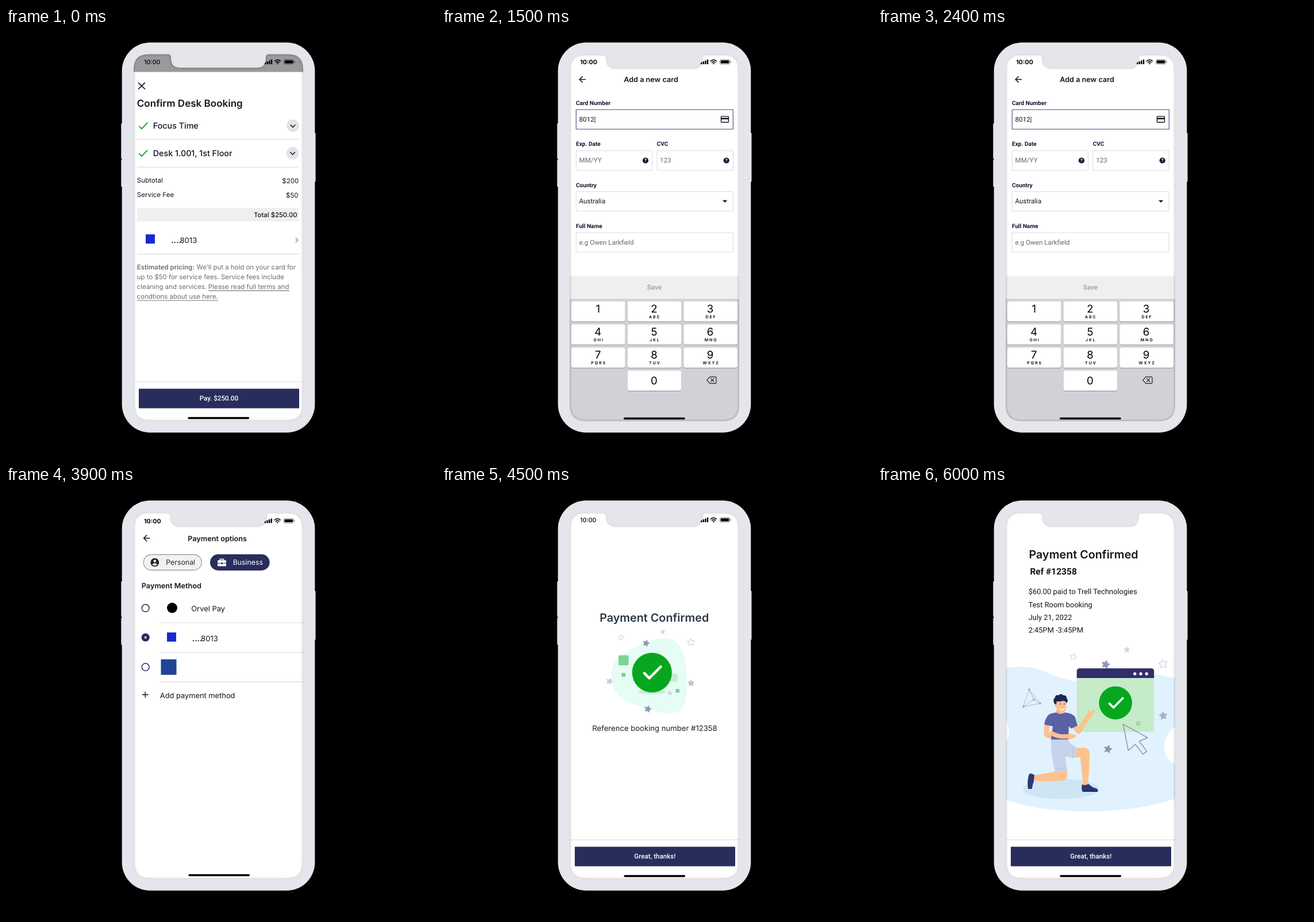
An HTML page that plays this animation: 748x748 px, repeating every 7500 ms.

```html
<!DOCTYPE html>
<html lang="en">
<head>
<meta charset="utf-8">
<title>Desk booking payment</title>
<style>
  html, body { margin: 0; width: 100%; height: 100%; overflow: hidden; background: #000; }
  svg { display: block; width: 748px; height: 748px; }
  text { text-rendering: geometricPrecision; font-optical-sizing: none; white-space: pre; }
  .i { font-family: Inter, sans-serif; }
  .r { font-family: Roboto, sans-serif; }
</style>
</head>
<body>
<svg id="stage" viewBox="0 0 748 748" xmlns="http://www.w3.org/2000/svg"></svg>
<script>
const NAVY = '#282d5c', INK = '#15151c', GREEN = '#06a71e', SKIN = '#fdc18e';

// Element helpers
const text = (x, y, str, size, o = {}) =>
  `<text class="${o.font || 'i'}" x="${x}" y="${y}" font-size="${size}" font-weight="${o.w || 400}" ` +
  `fill="${o.fill || INK}" text-anchor="${o.at || 'start'}" letter-spacing="${o.ls || 0}">${str}</text>`;
const rob = (x, y, str, size, o = {}) => text(x, y, str, size, { font: 'r', ...o });
const rect = (x, y, w, h, fill, r = 0, extra = '') =>
  `<rect x="${x}" y="${y}" width="${w}" height="${h}" rx="${r}" fill="${fill}" ${extra}/>`;
const circle = (x, y, r, fill, extra = '') =>
  `<circle cx="${x}" cy="${y}" r="${r}" fill="${fill}" ${extra}/>`;
const oval = (x, y, rx, ry, fill) => `<ellipse cx="${x}" cy="${y}" rx="${rx}" ry="${ry}" fill="${fill}"/>`;
const shape = (d, fill) => `<path d="${d}" fill="${fill}"/>`;
const line = (d, color, w = 1, cap = 'butt') =>
  `<path d="${d}" fill="none" stroke="${color}" stroke-width="${w}" stroke-linecap="${cap}" stroke-linejoin="${cap === 'round' ? 'round' : 'miter'}"/>`;
const rule = (x1, x2, y, color = '#dcdcdf') => line(`M${x1} ${y}H${x2}`, color, 1.2);

function star(x, y, r, color, turn = 10, hollow = false) {
  let pts = '';
  for (let k = 0; k < 10; k++) {
    const a = (turn - 90 + k * 36) * Math.PI / 180, q = k % 2 ? r * 0.5 : r;
    pts += `${(x + q * Math.cos(a)).toFixed(2)},${(y + q * Math.sin(a)).toFixed(2)} `;
  }
  return `<polygon points="${pts}" fill="${hollow ? 'none' : color}" stroke="${color}" stroke-width="1" stroke-linejoin="round"/>`;
}

// Shared pieces
function statusBar(weight, dx = 0, dy = 0) {
  let s = text(240.3, 63, '10:00', 10.6, { w: weight, fill: '#000' });
  for (let k = 0; k < 4; k++) {
    const h = 3.4 + k * 1.6;
    s += rect(450 + k * 3.6, 63 - h, 2.4, h, '#000', 0.6);
  }
  s += line('M467 57.8Q472.4 52.8 477.8 57.8', '#000', 1.7) +
       line('M469 60.2Q472.4 57 475.8 60.2', '#000', 1.6) +
       shape('M470.6 61.6Q472.4 60 474.2 61.6L472.4 63.4Z', '#000') +
       rect(483.4, 55, 17.2, 7.8, 'none', 2.2, 'stroke="#000" stroke-width=".8" stroke-opacity=".6"') +
       rect(484.8, 56.3, 14.4, 5.2, '#000', 1.2) +
       rect(501.4, 57.6, 1.2, 2.8, '#000', 0.6, 'opacity=".6"');
  return `<g transform="translate(${dx} ${dy})">${s}</g>`;
}
const home = (x, y) => rect(x, y, 106.7, 3.5, '#000', 1.75);
const backArrow = y => line(`M250 ${y}H239.2M244.7 ${y - 5.4}L239.2 ${y}L244.7 ${y + 5.4}`, INK, 1.5);
const button = (label, y, fill, color, w) =>
  rect(231, y, 279, 34, fill, 1) + rob(370.4, y + 20.6, label, 11.65, { w, fill: color, at: 'middle' });
const footer = (label) => rule(222, 517, 615.5) + button(label, 627.5, NAVY, '#fff', 500) + home(316.4, 676.7);
const cardTail = (x, y) => text(x, y, '....', 13.1, { w: 700 }) + text(x + 15.3, y, '8013', 13.1);

function dropRow(y, label, cx) {
  return line(`M231.3 ${y + 0.5}L236 ${y + 5.4}L246.2 ${y - 5.4}`, '#17a01e', 1.8) +
    text(255.8, y + 5.2, label, 14.3, { w: 500 }) +
    circle(cx, y, 10.9, '#e3e4ea') +
    line(`M${cx - 4.3} ${y - 1.8}L${cx} ${y + 2.5}L${cx + 4.3} ${y - 1.8}`, '#1d1d2b', 1.6);
}

function checkout(extra) {
  const g = { fill: '#6c6c70' }, size = 11.45;
  const u = 'text-decoration="underline" text-underline-offset="2"';
  return rect(222, 45, 295, 31.5, '#999a9b') + statusBar(500) +
    line('M230.2 95.2L241.8 106.4M241.8 95.2L230.2 106.4', INK, 1.7) +
    text(227.8, 137.4, 'Confirm Desk Booking', 17.05, { w: 600 }) +
    dropRow(170, 'Focus Time', 499) + rule(228, 509, 193.7) +
    dropRow(217.7, 'Desk 1.001, 1st Floor', 498.6) + rule(228, 509, 242.2) +
    text(227.8, 269.2, 'Subtotal', 11.55) + text(509.3, 269.8, '$200', 11.55, { at: 'end' }) +
    text(227.8, 294.3, 'Service Fee', 11.55) + text(508.6, 294.9, '$50', 11.55, { at: 'end' }) +
    rect(228, 313, 281, 23.5, '#efefef') +
    text(506.6, 329.2, 'Total $250.00', 11.35, { w: 500, at: 'end' }) +
    rect(243, 359, 16, 16, '#1a28cf') + cardTail(287.2, 373.7) +
    line('M503.8 365L507.8 369L503.8 373', '#8b8b90', 1.4) + rule(228, 509, 393.4) +
    text(227.8, 419.6, 'Estimated pricing:', size, { w: 600, ...g }) +
    text(331.6, 419.6, 'We’ll put a hold on your card for', size, g) +
    text(227.8, 436.9, 'up to $50 for service fees. Service fees include', size, g) +
    text(227.8, 454.1, 'cleaning and services.', size, g) +
    text(351.8, 454.1, 'Please read full terms and', size, g) +
    text(227.8, 471.3, 'condtions about use here.', size, g) +
    rule(352, 493, 456.8, '#77777b') + rule(228, 369.3, 474, '#77777b') + extra;
}

const payScene = () => checkout(footer('Pay. $250.00'));

const waitScene = () => checkout(
  circle(498.5, 133.5, 10.7, 'none', 'stroke="#e2e2e6" stroke-width="2.4"') +
  line('M497.4 122.9A10.7 10.7 0 0 1 499.8 122.9', '#111', 2.5) +
  rule(222, 517, 614.9) + button('Undo', 627, '#efefef', NAVY, 700) + home(316.4, 676));

function cardScene() {
  const label = (x, y, s) => rob(x, y, s, 10.1, { w: 700, fill: '#14152e' });
  const box = (x, y, w, color = '#dedee3') => rect(x, y, w, 34, '#fff', 0.5, `stroke="${color}" stroke-width="1.1"`);
  const help = x => circle(x, 230.5, 5.1, '#12132f') + rob(x, 233.4, '?', 8, { w: 700, fill: '#fff', at: 'middle' });
  const hint = { fill: '#67676c' };
  let s = statusBar(700) + backArrow(89.5) +
    text(316.2, 94.3, 'Add a new card', 12.65, { w: 600 }) +
    label(233, 133.6, 'Card Number') + box(233.3, 142, 273, '#4a4780') +
    rob(238.6, 162.8, '8012', 11.6) + rect(265.6, 154, 0.9, 11, INK) +
    rect(485.5, 153.6, 13, 10.4, 'none', 1.2, `stroke="${INK}" stroke-width="1.4"`) + rect(485.5, 156.2, 13, 2.6, INK) +
    label(233, 205.4, 'Exp. Date') + box(233.3, 213.5, 132.2) + rob(238.6, 234.4, 'MM/YY', 11.6, hint) + help(354) +
    label(373.7, 205.4, 'CVC') + box(374, 213.5, 132.3) + rob(379.2, 234.4, '123', 11.6, hint) + help(494.7) +
    label(233, 276.5, 'Country') + box(233.3, 284.5, 273) + rob(238.6, 305.3, 'Australia', 11.6) +
    shape('M488 299.6H496.2L492.1 303.8Z', '#12132f') +
    label(233, 348, 'Full Name') + box(233.3, 356, 273) + rob(238.6, 376.8, 'e.g Owen Larkfield', 11.6, hint) +
    rect(222, 432, 295, 39.5, '#efefef') + rob(369.4, 455.2, 'Save', 11.65, { w: 500, fill: '#9b9b9e', at: 'middle' }) +
    rect(222, 471.2, 295, 214, '#d1d2d8');
  const letters = ['', 'ABC', 'DEF', 'GHI', 'JKL', 'MNO', 'PQRS', 'TUV', 'WXYZ'];
  const key = (col, row, digit, sub) => {
    const x = 225 + col * 97.7, y = 475.5 + row * 40.2, mid = x + 46.7;
    return rect(x, y + 1, 93.5, 35, '#8b8c91', 3.6) + rect(x, y, 93.5, 35, '#fff', 3.6) +
      text(mid - 0.5, y + (digit ? 19 : 24), digit, 18.6, { at: 'middle', fill: '#000' }) +
      text(mid + 1, y + 29.2, sub, 7, { w: 600, ls: 1.9, at: 'middle', fill: '#000' });
  };
  letters.forEach((sub, k) => { s += key(k % 3, Math.floor(k / 3), k + 1, sub); });
  return s + key(1, 3, 0, '') +
    line('M465.8 606.8H475.4Q477 606.8 477 608.4V616.8Q477 618.4 475.4 618.4H465.8L460.8 612.6Z', '#222', 1.2, 'round') +
    line('M467.6 609.8L473 615.4M473 609.8L467.6 615.4', '#222', 1.2, 'round') + home(316, 677.5);
}

function optionsScene() {
  const radio = y => circle(242.7, y, 6.4, '#fff', `stroke="${NAVY}" stroke-width="1.5"`);
  return statusBar(700, -0.3, 1.6) + backArrow(90.8).replace('<path', '<path transform="translate(.4 0)"') +
    text(316.2, 95.7, 'Payment options', 12.7, { w: 600 }) +
    rect(239.3, 119.4, 101, 27, '#f1f1f3', 13.5, 'stroke="#929297" stroke-width="1.1"') +
    circle(258.8, 132.9, 7.4, '#222229') + circle(258.8, 130.5, 2.3, '#f1f1f3') +
    shape('M254.2 136.6Q258.8 131.9 263.4 136.6Q258.8 140.6 254.2 136.6Z', '#f1f1f3') +
    text(278.3, 137.3, 'Personal', 12.35, { fill: '#2a2a33' }) +
    rect(355, 118.8, 103.6, 28.2, NAVY, 14.1) +
    rect(368, 129, 15, 10.4, '#fff', 1.5) + line('M372.4 129V127.2H378.6V129', '#fff', 1.5) +
    line('M368 134.4H373.6M377.4 134.4H383', NAVY, 1) + rect(374, 133.3, 3, 2.6, NAVY) +
    text(394.7, 137.3, 'Business', 12.35, { fill: '#fff' }) +
    text(235.8, 178.4, 'Payment Method', 12.7, { w: 600 }) +
    radio(212.4) + circle(289, 212, 9, '#000') + text(322.2, 217.7, 'Orvel Pay', 12.95) + rule(266.5, 517, 238) +
    circle(242.7, 263.4, 7.1, NAVY) + circle(242.7, 263.4, 1.9, '#fff') +
    rect(280, 254.7, 16, 16, '#1a28cf') + cardTail(323.8, 269.6) + rule(266.5, 517, 289.5) +
    radio(315) + rect(269.5, 301.5, 27, 27, '#1f4595') + rule(266.5, 517, 340.6) +
    line('M236.9 363H247.5M242.2 357.7V368.3', INK, 1.4) +
    text(267.8, 368.6, 'Add payment method', 12.85) + home(317.3, 675.2);
}

function doneScene() {
  return statusBar(500) +
    text(369.2, 236.2, 'Payment Confirmed', 19.75, { w: 600, fill: '#2b3648', at: 'middle' }) +
    shape('M390 265C412 265 423 290 425 318C426 340 428 352 424 372C420 394 405 397 385 395C365 392 350 385 330 379C308 372 295 352 295 333C294 312 302 298 322 288C345 277 362 265 390 265Z', '#e5fdf4') +
    oval(365.5, 358, 24, 4.2, '#cdeadb') +
    rect(396.5, 326.5, 13.5, 13.8, '#c6eccd', 2) + circle(365.3, 324.6, 34.6, GREEN) +
    line('M352 325.6L360.6 334.4L380.6 314.2', '#fff', 4.4, 'round') +
    rect(307, 294.4, 17.6, 17.6, '#7fd492', 2) + rect(312.4, 325.2, 6.8, 6.8, '#84cd92', 1) +
    rect(406.5, 353, 6.6, 6.6, '#80cf93', 1) +
    star(355, 273.5, 5.8, '#8f99b4', 15) + star(384, 254, 3.9, '#d3d5df', 5) +
    star(291.5, 340, 5.8, '#cbced9', 20) + star(433, 343, 5.8, '#bec2d2', -5) + star(358, 388, 6, '#8f99b4', 15) +
    star(311.3, 263.5, 5, '#cfd2db', 10, true) + star(433, 272, 6.6, '#c4c8d4', -8, true) +
    star(396.4, 360.2, 3.5, '#aab2c4', 10, true) +
    text(370, 426.2, 'Reference booking number #12358', 13.12, { at: 'middle', fill: '#1c1b2b' }) +
    footer('Great, thanks!');
}

function person() {
  return oval(318, 527, 66, 17.5, '#cfe5f4') +
    // back leg and shoe
    shape('M308 490L329 492Q331 508 325 512Q300 515 272 513L270 503Q292 501 309 496Z', SKIN) +
    shape('M263 501Q268 499 272 503L271 514Q268 522 268 527H261Q259 512 263 501Z', '#2f3674') +
    // front leg and shoe
    shape('M340 456L360 455Q368 457 368 466Q368 490 365 521H357Q354 495 352 472L340 472Z', SKIN) +
    shape('M355 519Q361 522 366 518Q373 525 380 526Q384 529 382 532H356Q353 526 355 519Z', '#2f3674') +
    line('M355.5 530.6H382', '#1d2250', 1.4) +
    // shorts
    shape('M301 441H330Q334 449 346 455L344 473Q334 473 326 470L328 495Q318 499 308 496Q300 464 301 441Z', '#c6d3ec') +
    line('M326 470Q321 461 315 458M309 491Q318 494 328 490M340 455.5L338.5 472.5', '#aebedd', 0.9) +
    // arms
    line('M296 410Q291 427 294 433Q308 438 333 435', SKIN, 9, 'round') +
    shape('M328 430Q338 431 345 434Q344 439 334 440L327 439Z', SKIN) +
    line('M338 413L349 427L366 400', SKIN, 8.5, 'round') +
    shape('M361 401Q366 394 367 389L369 393L377 388Q376 397 368 405Z', SKIN) +
    // neck and shirt
    shape('M311 386H323V397Q317 402 310 396Z', '#f5ae78') +
    shape('M310 394Q317 399 325 394Q338 395 343 402L347 417L336 422L332 418L331 441H301L304 418L289 415Q292 399 300 396Z', '#5a62a6') +
    line('M304 418L306 408M332 418L330 409', '#474f92', 1) +
    line('M302 430Q315 438 333 435', SKIN, 7.5, 'round') +
    // head
    shape('M310 373Q318 368 327 373Q329 384 326 391Q322 397 317 395Q311 391 310 382Z', SKIN) +
    circle(309.6, 382, 2.4, SKIN) +
    shape('M307 379Q303 371 308 368Q308 363 314 364Q319 360 322 364Q329 364 328 369Q332 372 328 378Q326 373 320 374Q313 376 311 374L310 380Z', '#1e2656') +
    line('M316 379.3H318.6M323 379.3H325.4', '#3a2c35', 0.9) +
    line('M317 388.3Q321 391 324 387.8', '#fff', 1.5, 'round') + line('M321.5 380.5L322.5 385', '#e79d69', 0.8);
}

function receiptScene() {
  const soft = '#a9aebb', dot = (x, y) => circle(x, y, 2, soft);
  return text(262.5, 126.3, 'Payment Confirmed', 19.75, { w: 600 }) +
    rob(264.4, 154, 'Ref #12358', 15.5, { w: 700 }) +
    ['$60.00 paid to Trell Technologies', 'Test Room booking', 'July 21, 2022', '2:45PM -3:45PM']
      .map((s, k) => rob(261.7, 188.4 + k * 22.2, s, 12.9)).join('') +
    shape('M222 317C248 310 275 316 300 327C345 346 380 343 420 334C455 326 490 326 517 335V418C505 427 498 440 498 455C499 470 507 480 517 484V544C470 559 420 566 360 566C305 565 260 560 222 545V446C226 441 228 435 228 427C228 419 226 411 222 404Z', '#e1f2fe') +
    line('M263 354L252.5 384L282 378ZM263 354L271 371.5L282 378M271 371.5L252.5 384', soft, 0.9) +
    dot(263, 354) + dot(253, 384) + dot(282, 378.2) + dot(271, 371.4) +
    star(396, 310.5, 7.4, '#8d97b1', 15) +
    rect(345.8, 317.2, 134.4, 110.6, '#c5ebc9', 5) +
    shape('M345.8 334V322Q345.8 317.2 350.8 317.2H475.2Q480.2 317.2 480.2 322V334Z', '#312e69') +
    [446.8, 457, 467.2].map(x => circle(x, 326.7, 2.6, '#fff')).join('') +
    circle(413.2, 377.2, 28.8, GREEN) + line('M402.6 378.4L409.7 385.5L425.8 369', '#fff', 3.7, 'round') +
    star(433, 285, 4.8, '#d0d3dd', 5) + star(496.2, 399.6, 7.3, '#aab2c7', -8) + star(400, 457.8, 7.2, '#8d97b1', 15) +
    star(340, 297.6, 6, '#cfd2db', 10, true) + star(496, 309.6, 8, '#c0c5d2', -8, true) + star(453, 413, 4, '#8fa39b', 10, true) +
    line('M426.4 414.4L469 437.8L454.4 444L467.6 461.4L461 466.6L447.8 449.4L435.4 460Z', '#8f95aa', 1.5, 'round') +
    person() + footer('Great, thanks!');
}

// Phone shell with the scenes clipped to its screen
const screen = 'M248 45.5H281Q287.3 45.5 287.3 51.5V53.5Q287.3 69 303 69H436Q451.7 69 451.7 53.5V51.5Q451.7 45.5 458 45.5H491Q517 45.5 517 71.5V656Q517 684 489 684H250Q222 684 222 656V71.5Q222 45.5 248 45.5Z';
const scenes = [[1000, payScene], [500, waitScene], [1500, cardScene], [1500, optionsScene], [1500, doneScene], [1500, receiptScene]];

document.getElementById('stage').innerHTML =
  `<defs><clipPath id="screen"><path d="${screen}"/></clipPath>
   <filter id="soft" x="-10%" y="-10%" width="120%" height="120%"><feGaussianBlur stdDeviation="1.8"/></filter></defs>` +
  rect(0, 0, 748, 748, '#000') +
  rect(200.3, 166, 4, 61.5, '#dfe0e5', 1) + rect(200.3, 229, 4, 47, '#dfe0e5', 1) + rect(534.5, 182.5, 4, 85, '#dfe0e5', 1) +
  rect(201.7, 25.3, 335.6, 678.5, '#e5e6eb', 49) +
  `<g clip-path="url(#screen)">` + rect(222, 45, 295, 640, '#fff') +
  scenes.map(([, draw]) => `<g class="scene" visibility="hidden">${draw()}</g>`).join('') +
  `<path d="${screen}" fill="none" stroke="#000" stroke-opacity=".2" stroke-width="3" filter="url(#soft)"/></g>`;

const layers = [...document.querySelectorAll('.scene')];
const loop = scenes.reduce((sum, [ms]) => sum + ms, 0);
const start = performance.now();
let shown = -1;

function tick() {
  let t = (performance.now() - start) % loop, k = 0;
  while (t >= scenes[k][0]) t -= scenes[k++][0];
  if (k !== shown) {
    layers.forEach((g, n) => g.setAttribute('visibility', n === k ? 'visible' : 'hidden'));
    shown = k;
  }
  requestAnimationFrame(tick);
}
tick();
</script>
</body>
</html>
```
